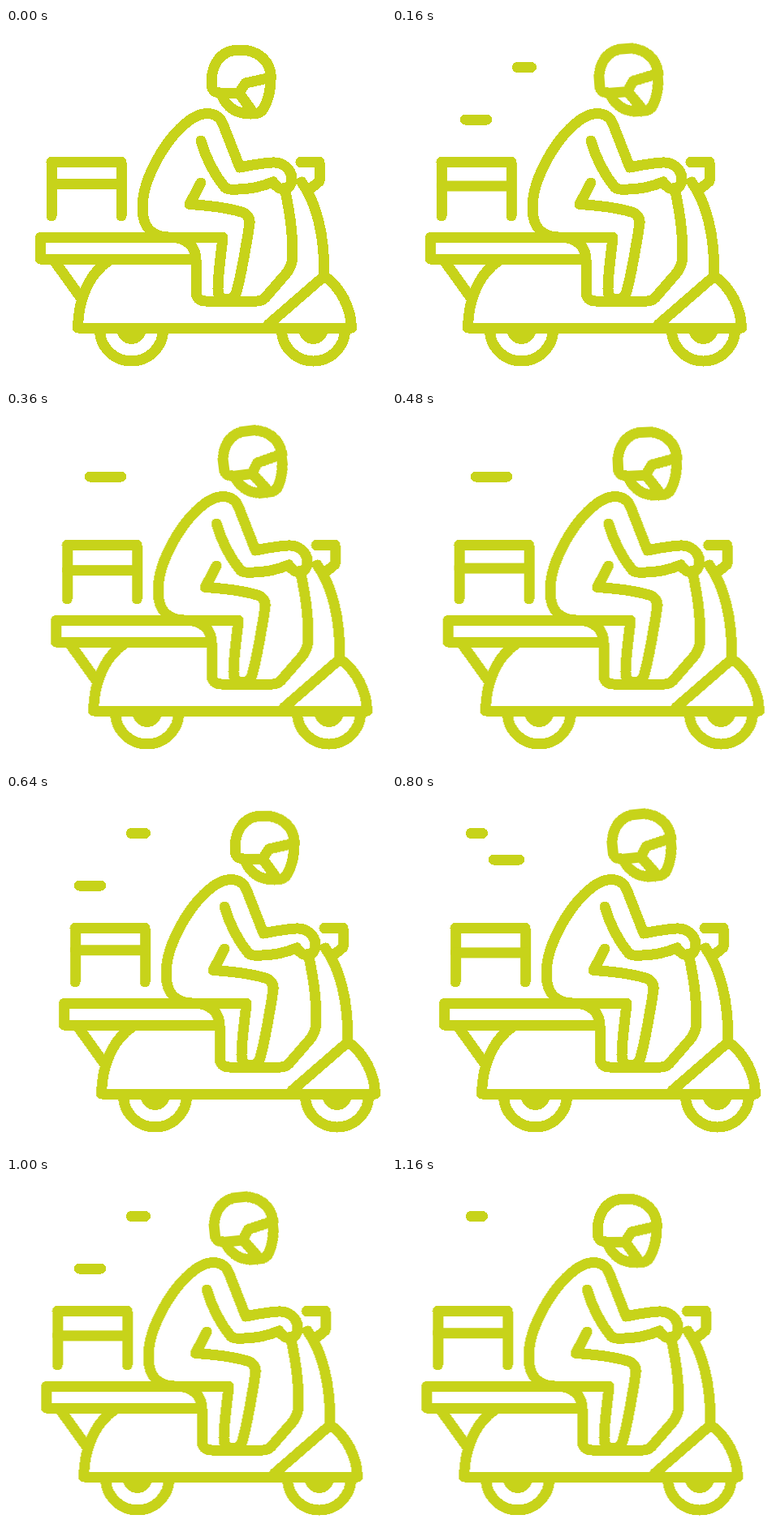
An HTML page that plays this animation: 468 by 438 pixels, repeating every 1200 ms.

```html
<!DOCTYPE html>
<html lang="en">
<head>
<meta charset="utf-8">
<title>Scooter delivery</title>
<style>
  html, body { margin: 0; width: 100%; height: 100%; overflow: hidden; background: #fff; }
  svg { display: block; width: 468px; height: 438px; shape-rendering: crispEdges; }
  g, path { fill: none; stroke: #c7d31a; stroke-width: 13; stroke-linecap: round; stroke-linejoin: round; }
  .hub { fill: #c7d31a; stroke: none; }
  #head { transform-origin: 261px 104px; }
</style>
</head>
<body>
<svg viewBox="0 0 468 438">
  <g id="wind"></g>
  <g id="bike">
    <!-- parcel box -->
    <path d="M56 232V165.5H142V232"/>
    <path id="lid" d="M56 192H142"/>

    <!-- seat, footwell and leg shield -->
    <path d="M267 258.5H42.5V285H233"/>
    <path d="M204 258.5C221 258.5 234 269 234 286V325Q234 337 246 337H309Q315 337 319 333L345 303Q352.5 294 352.5 283V268C352.5 245 348 220 343 197"/>

    <!-- body shell -->
    <path d="M60 288L91.500 332"/>
    <path d="M127 287C103 302 89 334 88.5 370H425.5C425 345 412 320 392 306L323 366"/>
    <path d="M364 190C383 217 392 257 392 304"/>
    <path d="M363 165.5H386V189L373 200"/>

    <!-- wheels -->
    <path d="M115.5 372A39 39 0 0 0 193.5 372"/>
    <path d="M339.5 372A39 39 0 0 0 417.5 372"/>
    <path class="hub" d="M136.5 372a18 18 0 0 0 36 0z"/>
    <path class="hub" d="M360.5 372a18 18 0 0 0 36 0z"/>

    <!-- rider -->
    <path d="M200 258C180 258 168 245 168 222C168 185 199 130 232 110C247 102 262 105 267 118L288 172C302 169 315 167 328 166C341 165 351 174 352 185Q352 198 341 199Q334 198 329 190C312 197 295 200 276 199Q272 199 269 196C256 180 247 163 240 139"/>
    <path d="M240 191L226 217.500C250 219 273 222 290 227Q301 231 300 242C295 272 291 300 284 325Q281 335 272 335Q261 335 261 322C261 305 264 285 267 259"/>

    <g id="head">
      <path d="M287 80H264Q253 80 253 68C253 42 266 27 288 27C312 27 326 42 326.500 61L295 68L287 80L304 104"/>
      <path d="M326 61C326 80 322 92 316 101Q312 106 303 106C285 106.500 271 98 266 83"/>
    </g>
  </g>
</svg>
<script>
  const LOOP = 1200, STEPS = 30;
  const $ = id => document.getElementById(id);

  // Plays pose(step) as held poses across the loop.
  function play(el, pose) {
    const keys = Array.from({ length: STEPS + 1 }, (_, i) => ({
      ...pose(i % STEPS), offset: i / STEPS, easing: 'steps(1, end)'
    }));
    el.animate(keys, { duration: LOOP, iterations: Infinity });
  }

  // Smooth 0 -> 1 -> 0, repeated n times per loop.
  const wave = (i, n) => (1 - Math.cos(2 * Math.PI * n * i / STEPS)) / 2;

  play($('bike'), i => ({ transform: `translateX(${29.5 * wave(i, 1)}px)` }));
  play($('head'), i => ({ transform: `rotate(${-8 * wave(i, 2)}deg)` }));
  play($('lid'), i => ({ transform: `translateY(${4.5 * wave(i, 2)}px)` }));

  // Wind streak between outer edges, shown on one beat of three.
  function streak(left, right, y, beat, first = 0, last = STEPS) {
    const el = document.createElementNS('http://www.w3.org/2000/svg', 'path');
    el.setAttribute('d', `M${left + 6.5} ${y}H${right - 6.5}`);
    $('wind').append(el);
    play(el, i => ({ opacity: i % 3 === beat && i >= first && i <= last ? 1 : 0 }));
  }

  streak(148, 178, 48.5, 1);
  streak(91, 118, 48.5, 2);
  streak(119, 163, 81, 2, 2, 26);
  streak(97, 148, 81, 0, 3, 27);
  streak(84, 123, 113, 1);
</script>
</body>
</html>
```
